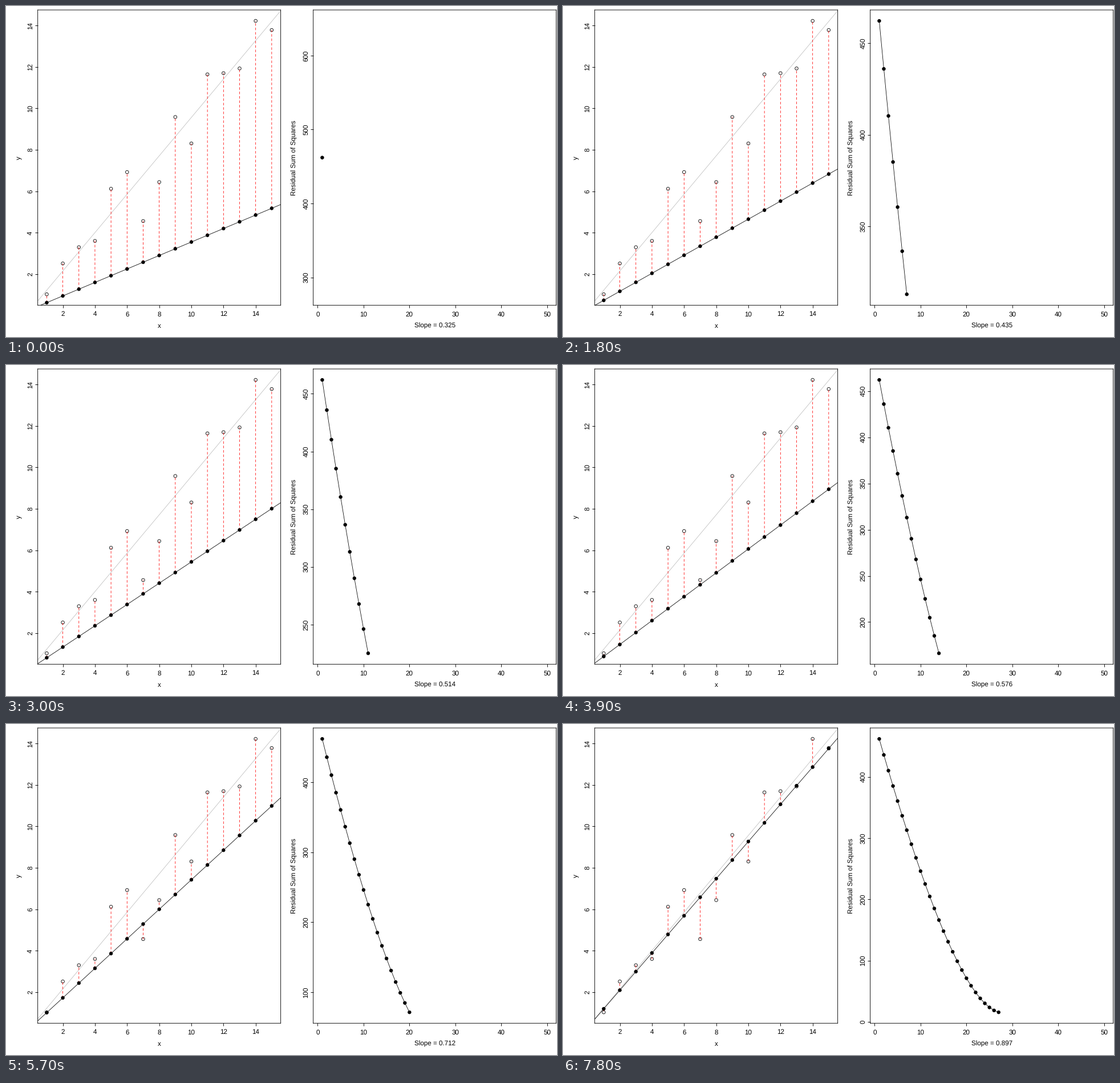
A matplotlib script that plays this animation: 966x580 px, repeating every 8 s.

```python
import math

import matplotlib.pyplot as plt
import numpy as np
from matplotlib.animation import FuncAnimation

WIDTH, HEIGHT, DPI = 966, 580, 64
PX = 72 / DPI  # points per pixel
TOP, BOTTOM, PANEL_WIDTH = 6.96, 524.32, 425.97
LEFT_X, RIGHT_X = 55.64, 538.64
FONT_PX = 11.6
XLABEL_Y, YLABEL_GAP = 564, 30.6
STEP_MS, INTERVAL = 300, 100
LINE_W = 0.8 * PX

plt.rcParams.update({
    "font.family": "Liberation Sans",
    "font.size": FONT_PX * PX,
    "text.hinting": "none",
    "ytick.alignment": "center",
    "lines.scale_dashes": False,
    "axes.linewidth": 0.9 * PX,
})

x = np.arange(1, 16)
y = np.array([1.037, 2.523, 3.307, 3.61, 6.125, 6.93, 4.568, 6.447,
              9.585, 8.311, 11.642, 11.70, 11.928, 14.22, 13.78])
best_slope, intercept = np.polyfit(x, y, 1)

# The trial line turns by equal angles.
slopes = np.tan(np.radians(np.linspace(18, 63, 50)))
rss = ((y - intercept - np.outer(slopes, x)) ** 2).sum(axis=1)


def padded(low, high):
    """Axis limits with a 4 % margin; a single value gets a wide range."""
    if low == high:
        low, high = 0.6 * low, 1.4 * high
    margin = 0.04 * (high - low)
    return low - margin, high + margin


def pretty_ticks(low, high):
    """Round tick values, about five of them."""
    cell = (high - low) / 5
    base = 10 ** math.floor(math.log10(cell))
    unit = base
    for factor, bias in ((2, 0.8), (5, 1.7), (10, 0.8)):
        if factor * base - cell >= bias * (cell - unit):
            break
        unit = factor * base
    return [k * unit for k in range(math.ceil(low / unit),
                                    math.floor(high / unit) + 1)]


def set_y_axis(ax, low, high):
    ticks = pretty_ticks(low, high)
    ax.set_yticks(ticks, [f"{t:g}" for t in ticks])
    ax.set_ylim(low, high)


def make_panel(left, x_limits, x_ticks):
    ax = fig.add_axes([left / WIDTH, 1 - BOTTOM / HEIGHT,
                       PANEL_WIDTH / WIDTH, (BOTTOM - TOP) / HEIGHT])
    ax.set_xticks(x_ticks)
    ax.set_xlim(*x_limits)
    ax.tick_params(length=5 * PX, width=0.9 * PX)
    ax.tick_params(axis="x", pad=5.4 * PX)
    ax.tick_params(axis="y", pad=2 * PX, labelrotation=90)
    for spine in ax.spines.values():
        spine.set_snap(False)
    return ax


def label(px, py, text, rotation=0):
    return fig.text(px / WIDTH, 1 - py / HEIGHT, text, rotation=rotation,
                    rotation_mode="anchor", ha="center", va="baseline")


def markers(ax, xs, ys, face, zorder=3):
    dots = ax.scatter(xs, ys, facecolors=face, edgecolors="black",
                      linewidths=0.85 * PX, zorder=zorder)
    # One size per dot keeps their centres off the pixel grid.
    dots.set_sizes(np.full(len(slopes), (5.5 * PX) ** 2), DPI)
    return dots


fig = plt.figure(figsize=(WIDTH / DPI, HEIGHT / DPI), dpi=DPI,
                 facecolor="white")

fit_ax = make_panel(LEFT_X, padded(1, 15), range(2, 15, 2))
ends = np.array(fit_ax.get_xlim())
markers(fit_ax, x, y, "none", zorder=2)
fit_ax.plot(ends, intercept + best_slope * ends, color="#bebebe",
            linewidth=LINE_W, zorder=2.1)
trial_line, = fit_ax.plot([], [], color="black", linewidth=LINE_W, zorder=2.2)
residuals = fit_ax.vlines(x, y, y, color="red", linewidth=0.8 * PX,
                          linestyle=(0, (3.86 * PX, 3.86 * PX)),
                          capstyle="round", snap=False, zorder=2.3)
fitted_dots = markers(fit_ax, x, y, "black")
fit_ax.set_xlim(*ends)
set_y_axis(fit_ax, *padded(y.min(), y.max()))

rss_limits = padded(1, 50)
rss_ax = make_panel(RIGHT_X, rss_limits, range(0, 51, 10))
rss_line, = rss_ax.plot([], [], color="black", linewidth=LINE_W)
rss_dots = markers(rss_ax, [], [], "black")
rss_ax.set_xlim(*rss_limits)

middle = (TOP + BOTTOM) / 2
label(LEFT_X + PANEL_WIDTH / 2, XLABEL_Y, "x")
label(LEFT_X - YLABEL_GAP, middle, "y", 90)
label(RIGHT_X - YLABEL_GAP, middle, "Residual Sum of Squares", 90)
slope_label = label(RIGHT_X + PANEL_WIDTH / 2, XLABEL_Y, "")


def update(frame):
    step = frame * INTERVAL // STEP_MS
    slope = slopes[step]
    fitted = intercept + slope * x
    trial_line.set_data(ends, intercept + slope * ends)
    fitted_dots.set_offsets(np.column_stack([x, fitted]))
    residuals.set_segments([[(a, b), (a, c)] for a, b, c in zip(x, fitted, y)])

    count = np.arange(1, step + 2)
    shown = rss[:step + 1]
    rss_line.set_data(count, shown)
    rss_dots.set_offsets(np.column_stack([count, shown]))
    set_y_axis(rss_ax, *padded(shown.min(), shown.max()))
    slope_label.set_text(f"Slope = {slope:.3f}")
    return trial_line, fitted_dots, residuals, rss_line, rss_dots, slope_label


anim = FuncAnimation(fig, update, frames=80, interval=INTERVAL, repeat=True,
                     repeat_delay=0, blit=False)
plt.show()
```
